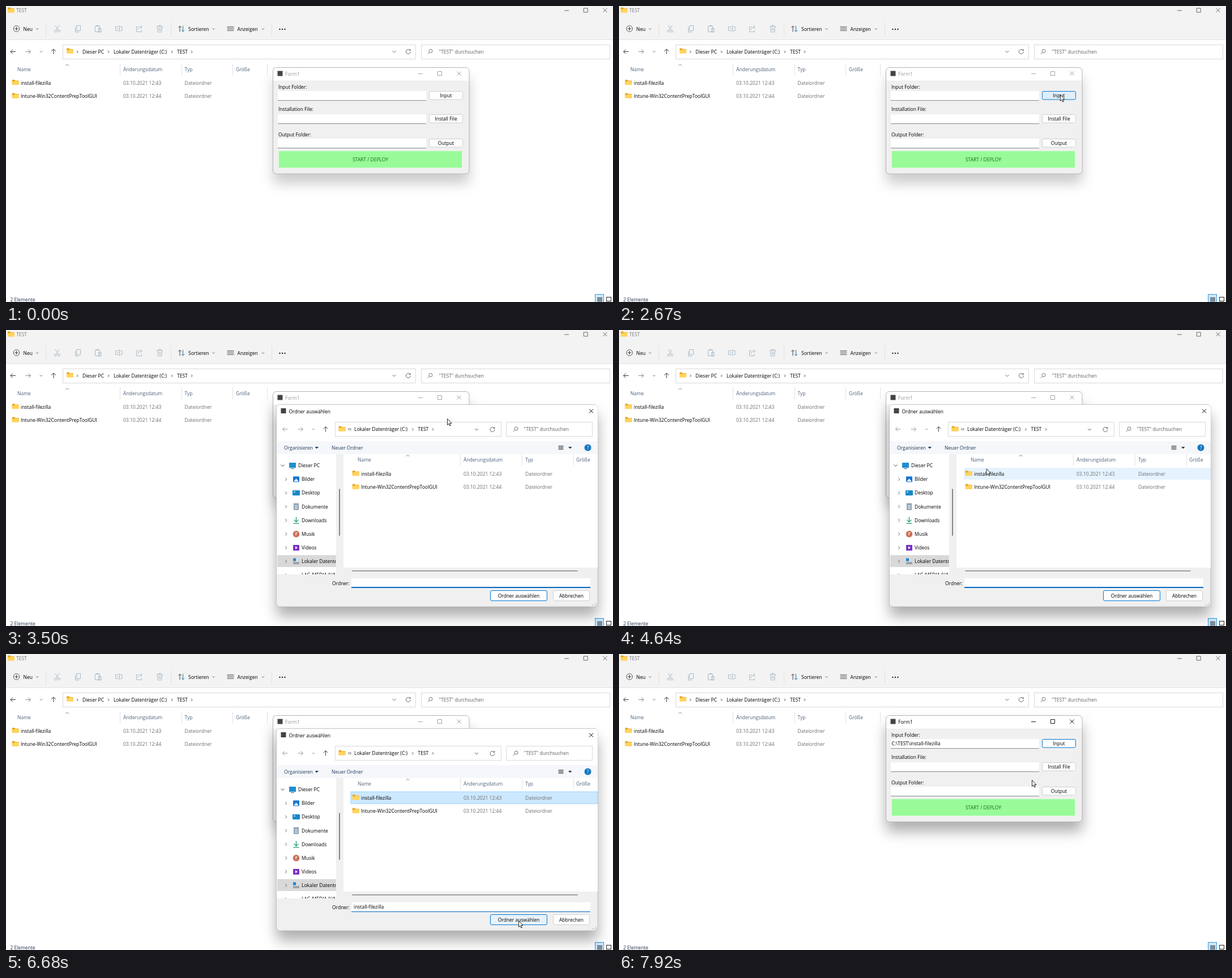
An HTML page for the animation above (7990 ms loop, 1072 px wide and 522 px high).

```html
<!DOCTYPE html>
<html lang="de">
<head>
<meta charset="utf-8">
<title>Ordner auswählen</title>
<style>
html, body { margin: 0; width: 100%; height: 100%; overflow: hidden; background: #fff; }
svg { display: block; }
text { font: 8.5px "Open Sans", "Noto Sans", sans-serif; white-space: pre; }
</style>
</head>
<body>
<svg id="stage" width="1072" height="522" viewBox="0 0 1072 522"></svg>
<script>
const LOOP = 7990;
const NAVY = '#4c607a', GRAY = '#6d6d6d', BLUE = '#0067c0';

// Drawing helpers; text takes its vertical middle and sits on a whole-pixel baseline.
const text = (x, y, s, fill = '#000', extra = '') =>
  `<text x="${x}" y="${Math.round(y + 3)}" fill="${fill}" ${extra}>${s}</text>`;
const centered = (x, y, s, fill) => text(x, y, s, fill, 'text-anchor="middle"');
const rect = (x, y, w, h, fill, extra = '') =>
  `<rect x="${x}" y="${y}" width="${w}" height="${h}" fill="${fill}" ${extra}/>`;
const line = (d, stroke = '#333', width = 1, extra = '') =>
  `<path d="${d}" fill="none" stroke="${stroke}" stroke-width="${width}" ${extra}/>`;
const box = (x, y, w, h, stroke, fill = '#fff', rx = 0, extra = '') =>
  rect(x + .5, y + .5, w - 1, h - 1, fill, `stroke="${stroke}" rx="${rx}" ${extra}`);
const group = (id, body, extra = '') => `<g id="${id}" ${extra}>${body}</g>`;
const circle = (x, y, r, fill, extra = '') => `<circle cx="${x}" cy="${y}" r="${r}" fill="${fill}" ${extra}/>`;

const down = (x, y, c = '#555', s = 2) => line(`M${x - s} ${y - s / 2}l${s} ${s}l${s} ${-s}`, c, .9);
const up = (x, y) => line(`M${x - 3} ${y + 1.5}l3 -3l3 3`, '#666', .8);
const right = (x, y, c = '#444', s = 2) => line(`M${x - s / 2} ${y - s}l${s} ${s}l${-s} ${s}`, c, 1);
const left = (x, y) => line(`M${x + 1} ${y - 2}l-2 2l2 2`, '#444', 1);
const arrow = (x, y, angle, c = '#333') =>
  line('M-4.5 0H4.5M-.8 -3.8L-4.5 0L-.8 3.8', c, 1, `transform="translate(${x} ${y}) rotate(${angle})"`);
const refresh = (x, y) => line(`M${x + 3} ${y - 2.7}a4 4 0 1 0 1 2.7M${x + 3.7} ${y - 4.5}v2.4h-2.4`, '#555', .9);
const lens = (x, y) => circle(x + 1, y - 1, 3, 'none', 'stroke="#777"') + line(`M${x - 1.3} ${y + 1.3}l-3 3`, '#777');
const folder = (x, y) => `<g transform="translate(${x} ${y})">` +
  `<path d="M-6 -3.5q0 -1.5 1 -1.5h3l1.5 1.5h5.5q1 0 1 1v6h-12z" fill="#e9a820"/>` +
  `<path d="M-6 -1.8h4l1.3 -1h6.7v6q0 1 -1 1h-10q-1 0 -1 -1z" fill="#ffd45e"/></g>`;
const windowKeys = (x1, x2, x3, y, c) =>
  line(`M${x1 - 4} ${y + .5}h8M${x2 - 3.5} ${y - 3.5}h7v7h-7zM${x3 - 3.5} ${y - 3.5}l7 7m0 -7l-7 7`, c, .9);
const button = (id, x, y, w, h, s) => box(x, y, w, h, '#d0d0d0', '#fdfdfd', 2.5, `id="${id}"`) +
  centered(x + w / 2, y + h / 2 + .4, s);
const shadow = (id, x, y, w, h, filter) => rect(x, y, w, h, '#888', `id="${id}" rx="6" filter="url(#${filter})"`);

const fileRow = (cols, y, name, time) => folder(cols[0] - 9.3, y - .5) + text(cols[0], y, name) +
  text(cols[1], y, '03.10.2021 ' + time, GRAY) + text(cols[2], y, 'Dateiordner', GRAY);
const fileList = (cols, ys) => fileRow(cols, ys[0], 'install-filezilla', '12:43') +
  fileRow(cols, ys[1], 'Intune-Win32ContentPrepToolGUI', '12:44');
const headers = (xs, y) => ['Name', 'Änderungsdatum', 'Typ', 'Größe'].map((s, i) => text(xs[i], y, s, NAVY)).join('');
const dividers = (xs, y1, y2) => line(xs.map(x => `M${x}.5 ${y1}V${y2}`).join(''), '#e2e2e2');

function explorer() {
  const c = '#a9bac8';
  return rect(0, 0, 1072, 60, '#f3f3f3') + rect(0, 59, 1072, 1, '#e3e3e3') +
    folder(9, 7.5) + text(18, 8, 'TEST', '#777') + windowKeys(990, 1023.7, 1058, 7.5, '#555') +
    circle(18.5, 40, 5.3, 'none', 'stroke="#444" stroke-width=".9"') + line('M15.5 40h6M18.5 37v6', '#333') +
    text(30.5, 40.5, 'Neu') + down(55, 40.5) + dividers([70, 291, 469], 28, 53) +
    line('M87 34l5.5 9M94 34l-5.5 9', c) + circle(87.5, 44.3, 1.9, 'none', `stroke="${c}"`) + circle(93.5, 44.3, 1.9, 'none', `stroke="${c}"`) +
    line('M124.5 34.5h7v9h-7zM122.5 37v9h6.5', c) +
    line('M157.5 35.5h8v10h-8zM159.5 34.5h4M163.5 39.5h4.5v6.5h-4.5z', c) +
    line('M199 36.5h-5.5v7h5.5M202 36.5h3v7h-3M200.5 34v12M196 40h3', c) +
    line('M234 36.5h-3.5v9h9v-3M233 42q1 -5 6 -5M237 34.5l3.5 2.8l-3.5 2.8', c) +
    line('M266 36h11M267.5 36l.8 10h6.4l.8 -10M270 36v-2h3v2M270.5 38.5v5M272.7 38.5v5', c) +
    line('M307 45.5v-10M304.3 38l2.7 -2.7l2.7 2.7', '#444') + line('M312.5 35v10M309.8 42.5l2.7 2.7l2.7 -2.7', '#2877b5') +
    text(322, 40.5, 'Sortieren') + down(366.5, 40.5) +
    line('M390.5 36.5h12m-12 2.3h12m-12 2.4h12m-12 2.3h12', '#555', .9) +
    text(408.5, 40.5, 'Anzeigen') + down(454, 40.5) + [483.5, 488, 492.5].map(x => circle(x, 41, 1.2, '#222')).join('') +
    arrow(12.5, 80.5, 0) + arrow(39, 80.5, 180, '#888') + down(62, 80.5) + arrow(84, 80.5, 90) +
    box(100, 68, 624, 26, '#d9d9d9') + folder(113, 79.5) +
    [126, 181, 293, 328].map(x => right(x, 80.8)).join('') +
    text(135, 80.5, 'Dieser PC') + text(190, 80.5, 'Lokaler Datenträger (C:)') + text(302, 80.5, 'TEST') +
    down(685.5, 80.5, '#555', 3) + refresh(710.5, 80.5) +
    box(733, 68, 334, 26, '#d9d9d9') + lens(749, 80.5) + text(764.5, 80.5, '"TEST" durchsuchen', '#5f5f5f') +
    headers([20, 207, 315.5, 406], 111.5) + dividers([201, 310, 400, 461], 101, 122) + up(108, 104) +
    fileList([26, 207, 315.5], [135.5, 159]) +
    text(7.5, 517.5, '2 Elemente', '#24364f') +
    box(1040, 508, 16, 16, '#3a9bd9', '#cce8ff') + line('M1044 514.5h9m-9 2h9m-9 2h9m-9 2h9') +
    box(1060, 513, 9, 8, '#222');
}

function form() {
  const fields = [['Input Folder:', 142.5, 150, 'Input'], ['Installation File:', 182, 191, 'Install File'], ['Output Folder:', 226.5, 234, 'Output']];
  return shadow('formShade', 472, 109, 346, 187, 'soft') +
    rect(471.5, 108.5, 346.5, 187.5, '#f0f0f0', 'rx="6"') +
    `<path d="M472 131.5v-17q0 -6 6 -6h334q6 0 6 6v17z" fill="#fff"/>` +
    rect(471.5, 108.5, 346.5, 187.5, 'none', 'rx="6" stroke="#b4b4b4"') +
    rect(479.5, 114.5, 9, 9, '#444') +
    group('formTitle', text(493, 119.5, 'Form1', 'currentColor') + windowKeys(732, 766, 800, 119, 'currentColor')) +
    fields.map(([label, ly, y, name], i) => text(481, ly, label) + rect(480, y, 262, 16, '#fff') +
      rect(480, y + 16, 262, 1, '#8a8a8a') + button('formButton' + i, 747, y, 60, 15.5, name)).join('') +
    group('inputPath', text(481.5, 157.5, 'C:\\TEST\\install-filezilla')) +
    box(481, 255, 325, 31, '#e4f5e4', '#98fb98') + centered(643.5, 270.5, 'START / DEPLOY', '#1b6b1b');
}

function quickTree() {
  const items = ['Schnellzugriff', 'NORVALDIS GmbH', 'MoorDisk - NORVA', 'MoorDisk - Personal', 'Dieser PC', 'Netzwerk'];
  const disk = y => circle(506, y, 5, '#1583d0');
  const icons = [
    y => `<path transform="translate(506 ${y})" d="M0 -6L1.8 -2L6 -1.7L2.8 1.2L3.8 5.4L0 3.2L-3.8 5.4L-2.8 1.2L-6 -1.7L-1.8 -2z" fill="#f5b82e"/>`,
    y => rect(503, y - 5, 4, 10, '#24808f') + rect(507, y - 1, 3, 6, '#3ba0a8'), disk, disk,
    y => rect(500, y - 5, 12, 9, '#1f8fd0'),
    y => rect(502, y - 3, 9, 7, '#1f8fd0') + rect(500, y - 5, 6, 4, '#62b8e8')];
  return rect(478, 219, 120, 212, '#fff') + rect(479, 350, 117, 20, '#d9d9d9') +
    items.map((s, i) => { const y = 239.5 + i * 30.1; return right(488.5, y, '#666', 2.5) + icons[i](y) + text(516, y, s); }).join('');
}

function driveTree() {
  const items = ['Bilder', 'Desktop', 'Dokumente', 'Downloads', 'Musik', 'Videos', 'Lokaler Datenträger', 'LAG-MEDIA (\\\\NV)'];
  const square = (y, c) => rect(507, y - 5, 11, 10, c, 'rx="1"');
  const icons = [
    y => square(y, '#1976d2') + `<path d="M508 ${y + 4}l4.5 -5l4.5 5z" fill="#fff"/>`,
    y => rect(506, y - 4.5, 13, 9, '#1687c8', 'rx="1"') + rect(508, y - 2.5, 3, 1.5, '#d8f2ff'),
    y => rect(508, y - 6, 9, 12, '#8ea3b5') + line(`M510 ${y - 2}h5m-5 2.5h5m-5 2.5h5`, '#fff'),
    y => line(`M512.5 ${y - 6}v9M508.5 ${y - 1}l4 4l4 -4M507.5 ${y + 5.5}h10`, '#159a72', 1.3),
    y => circle(512.5, y, 5.8, '#c9705a') + line(`M512 ${y + 2.5}v-5l2.5 1`, '#fff', 1.1),
    y => square(y, '#7b33c4') + `<path d="M511 ${y - 2.5}l4 2.5l-4 2.5z" fill="#fff"/>`,
    y => rect(507, y - 5.5, 5, 5, '#1687d8') + rect(507, y + 1, 11, 4, '#9aa3ab'),
    y => rect(507, y - 1, 11, 4, '#9aa3ab')];
  return rect(478, 219, 105, 212, '#fff') + rect(479, 397, 104, 21, '#d9d9d9') +
    `<g clip-path="url(#treeClip)">` + down(488.5, 239, '#333', 3) + rect(500, 234, 12, 9, '#1f8fd0') + rect(503, 244, 6, 1, '#555') +
    text(516, 239, 'Dieser PC') +
    items.map((s, i) => { const y = 263.2 + i * 24.15; return right(494.5, y, '#666', 2.7) + icons[i](y) + text(522, y, s); }).join('') +
    `</g>` + rect(588, 280, 2, 83, '#868686', 'rx="1"');
}

function dialog() {
  return shadow('dialogShade', 478, 132, 567, 356, 'strong') + rect(477.5, 131.5, 567.5, 356.5, '#f0f0f0', 'rx="6" stroke="#aaa" stroke-width=".6"') +
    `<path d="M478 196v-58q0 -6 6 -6h555q6 0 6 6v58z" fill="#fff"/>` + rect(478, 196, 567, 23, '#f5f7fa') +
    rect(485.5, 138, 9, 9, '#444') +
    group('dialogTitle', text(499.5, 143.5, 'Ordner auswählen', 'currentColor') + line('M1030 139.5l7 7m0 -7l-7 7', 'currentColor')) +
    arrow(493, 175, 0, '#999') + arrow(520, 175, 180, '#999') + down(543, 175, '#888') + arrow(564.5, 175, 90, '#444') +
    circle(1027.5, 207.5, 6, '#1377c2') + centered(1027.5, 207.6, '?', '#fff') +
    rect(596, 219, 449, 200, '#fff') +
    rect(598, 219, 205, 20, '#d9ebf9', 'id="headHover"') +
    headers([621, 808, 917, 1007], 229.4) + dividers([802, 911, 1002], 219, 239) + up(709.5, 221.5) +
    [243, 266].map((y, i) => rect(609, y, 436, 21, '#e5f3ff', `id="row${i}"`)).join('') +
    fileList([627, 808, 917], [253.5, 277]) +
    rect(611, 424, 399, 1.5, '#868686', 'id="scroll" rx="1"') +
    group('scrollEnds', `<path d="M602 424.7l4 -2.5v5zM1041 424.7l-4 -2.5v5z" fill="#777"/>`) +
    group('quick', quickTree()) +
    group('loaded', driveTree() +
      box(581, 162, 294, 26, '#d9d9d9') + folder(593.5, 174.5) + left(605.5, 175) + left(608.5, 175) +
      text(615, 175, 'Lokaler Datenträger (C:)') + right(718.5, 175.3) + text(727.5, 175, 'TEST') + right(754, 175.3) +
      down(831, 175.5, '#555', 3) + refresh(859, 175.5) + box(883, 162, 153, 26, '#d9d9d9') + lens(900, 175) +
      text(914.5, 175, '"TEST" durchsuchen', '#5f5f5f') +
      text(491, 207.5, 'Organisieren', '#1e395b') + text(575, 207.5, 'Neuer Ordner', '#1e395b') +
      '<path d="M545.5 206h6.5l-3.25 3.5zM993 206h6.5l-3.25 3.5z" fill="#1e395b"/>' +
      line('M975.5 204.5h9m-9 2h9m-9 2h9m-9 2h9', '#444')) +
    text(576, 446.5, 'Ordner:') + rect(610, 438, 422, 17, '#fff') + rect(610, 453, 422, 2, BLUE, 'id="underline"') +
    rect(614, 440, 1, 11, '#000', 'id="caret"') + group('choice', text(614, 446, 'install-filezilla')) +
    button('choose', 855, 459, 101, 19, 'Ordner auswählen') + button('cancel', 966, 459, 65, 19, 'Abbrechen') +
    [[1041, 481], [1041, 484], [1038, 484], [1035, 484]].map(([x, y]) => rect(x, y, 1.3, 1.3, '#aaa')).join('');
}

const drop = (id, dy, blur, alpha) => `<filter id="${id}" x="-20%" y="-20%" width="140%" height="160%" color-interpolation-filters="sRGB">` +
  `<feDropShadow dx="0" dy="${dy}" stdDeviation="${blur}" flood-color="#000" flood-opacity="${alpha}"/></filter>`;
const stage = document.getElementById('stage');
stage.innerHTML = `<defs>${drop('soft', 17, 11, .2)}${drop('strong', 17, 12, .32)}` +
  `<clipPath id="treeClip"><rect x="478" y="219" width="104" height="212"/></clipPath></defs>` +
  explorer() + form() + group('dialog', dialog()) +
  group('cursor', '<path d="M.5 .5V11.5L3 9.2L4.7 13L6.4 12.3L4.7 8.5H8z" fill="#fff" stroke="#111" stroke-width=".9"/>');

const el = {};
stage.querySelectorAll('[id]').forEach(node => el[node.id] = node);
const set = (id, attrs) => { for (const k in attrs) el[id].setAttribute(k, attrs[k]); };
const show = (id, on) => set(id, { visibility: on ? 'visible' : 'hidden' });
const clamp = u => Math.max(0, Math.min(1, u));

// The screen refreshes in bursts: start, end, number of steps.
const bursts = [[710, 1470, 12], [1540, 1810, 5], [2670, 3230, 9], [3500, 3500, 1], [3960, 4710, 12],
  [4780, 4780, 1], [5040, 5720, 9], [5860, 6630, 12], [6680, 7100, 7], [7300, 7920, 10]];
function snap(t) {
  let shown = 0;
  for (const [start, end, n] of bursts) {
    if (t < start - 5) break;
    const step = (end - start) / (n - 1) || 1;
    shown = start + step * Math.min(n - 1, Math.floor((t - start + 15) / step));
  }
  return shown;
}

// Pointer moves: start, end, target x, y, easing for x and y.
const outBy = p => u => 1 - (1 - u) ** p;
const smooth = u => u * u * (3 - 2 * u);
const moves = [[710, 1470, 790, 167, outBy(1.38), outBy(1.8)], [1470, 1810, 779, 156], [3890, 4710, 646, 246],
  [4710, 4780, 651, 249], [4970, 5400, 669, 253], [5790, 6630, 905, 470], [7230, 7920, 729, 222]];
function pointer(t) {
  let x = 1049, y = 480;
  for (const [a, b, tx, ty, ex = smooth, ey = ex] of moves) {
    const u = clamp((t - a) / (b - a));
    x += (tx - x) * ex(u);
    y += (ty - y) * ey(u);
  }
  return [x, y];
}

function draw(time) {
  const t = snap(time);
  const [x, y] = pointer(t);
  const within = (l, top, r, b) => x >= l && x < r && y >= top && y < b;
  const open = t >= 2920 && t < 7090;
  const closing = t >= 6880;
  const picked = t >= 5440;

  show('cursor', t >= 710);
  set('cursor', { transform: `translate(${x} ${y})` });

  set('formTitle', { color: closing ? '#000' : '#999' });
  set('formShade', { filter: `url(#${closing ? 'strong' : 'soft'})` });
  show('inputPath', closing);
  const focused = t >= 2670 || within(747, 150, 807, 166);
  set('formButton0', { stroke: focused ? '#0078d4' : '#d0d0d0', fill: focused && !closing ? '#e0eef9' : '#fdfdfd' });

  // The dialog grows while fading in and shrinks while fading out.
  const entering = clamp((t - 2920) / 240), leaving = clamp((t - 6940) / 150);
  const scale = 1 - .12 * (1 - entering) ** 2 - .075 * leaving;
  const shift = 1 - scale;
  set('dialog', {
    display: open ? 'inline' : 'none', opacity: clamp(entering * 4) * (1 - leaving),
    transform: `translate(${761.5 - shift * 52} ${310 - shift * 26}) scale(${scale}) translate(-761.5 -310)`
  });
  set('dialogTitle', { color: closing ? '#888' : '#000' });
  const ready = t >= 3150;
  show('quick', !ready);
  show('loaded', ready);

  const free = ready && !closing;
  show('headHover', free && within(598, 219, 803, 239));
  show('row0', picked || free && within(609, 243, 1045, 264));
  set('row0', { fill: closing ? '#d9d9d9' : picked ? '#cce8ff' : '#e5f3ff', stroke: picked && !closing ? '#99d1ff' : 'none' });
  show('row1', free && within(609, 266, 1045, 287));
  const wide = free && within(598, 412, 1045, 434);
  set('scroll', { y: wide ? 422.5 : 424, height: wide ? 4 : 1.5 });
  show('scrollEnds', wide);

  show('choice', picked);
  show('caret', !picked && (t < 3500 || Math.floor((t - 2970) / 530) % 2 === 0));
  set('underline', { y: picked ? 454 : 453, height: picked ? 1 : 2, fill: closing ? '#999' : BLUE });
  set('choose', { stroke: closing ? '#f4f8fb' : '#0078d4', fill: within(855, 459, 956, 478) ? '#e8f2fa' : '#fdfdfd' });
}

const begin = performance.now();
function tick() {
  draw((performance.now() - begin) % LOOP);
  requestAnimationFrame(tick);
}
tick();
</script>
</body>
</html>
```
